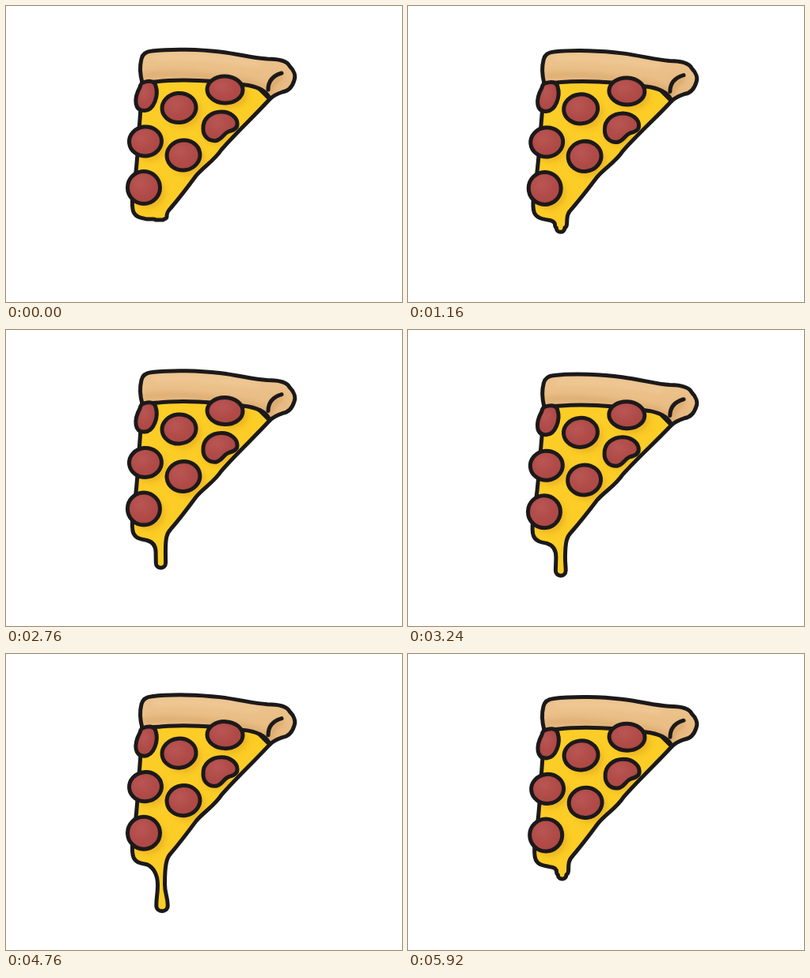
Write an HTML page that moves like this. It is 500 px wide and 375 px high and loops after 5.96 s.

```html
<!DOCTYPE html>
<html>
<head>
<meta charset="utf-8">
<style>
html, body { margin: 0; height: 100%; overflow: hidden; background: #fff; }
svg { display: block; width: 500px; height: 375px; }
.ink { stroke: #1c191a; stroke-width: 5; stroke-linejoin: round; stroke-linecap: round; }
</style>
</head>
<body>
<svg viewBox="0 0 500 375">
  <defs>
    <filter id="soft" x="-50%" y="-50%" width="200%" height="200%"><feGaussianBlur stdDeviation="3.5"/></filter>
    <radialGradient id="meat" cx=".4" cy=".36" r=".65">
      <stop offset="0" stop-color="#b95653"/>
      <stop offset=".6" stop-color="#b04b48"/>
      <stop offset="1" stop-color="#ac4744"/>
    </radialGradient>
    <linearGradient id="bread" x1="0" y1="0" x2="0" y2="1">
      <stop offset="0" stop-color="#edc48e"/>
      <stop offset="1" stop-color="#e7b97f"/>
    </linearGradient>
    <path id="cheese"/>
    <path id="crust" d="M172 97C169 86 169 75 171 67Q173 58 184 57C210 54 245 55 270 58C295 61 312 66 330 67
      C346 67 355 70 358 76C364 82 366 89 364 94C361 104 356 108 349 109C343 111 337 114 333 118
      C330 109 319 103 306 100.5C275 96 235 93 205 94.5C190 95.5 180 97 172 97Z"/>
    <clipPath id="inCheese"><use href="#cheese"/></clipPath>
    <clipPath id="inCrust"><use href="#crust"/></clipPath>
  </defs>
  <g id="slice">
    <path id="drop" class="ink" fill="#fccd26"/>
    <use href="#cheese" fill="#fccd26"/>
    <g clip-path="url(#inCheese)">
      <g id="shade" filter="url(#soft)" fill="#dfa424" opacity=".6"></g>
    </g>
    <use href="#cheese" class="ink" fill="none"/>
    <use href="#crust" fill="url(#bread)"/>
    <g clip-path="url(#inCrust)">
      <g filter="url(#soft)" fill="none" stroke-width="6" opacity=".6">
        <path d="M172 89C200 83 240 87 275 92S325 99 334 114" stroke="#cf9c5e"/>
        <path d="M332 113Q332 97 349 89" stroke="#c79152"/>
        <path d="M186 65Q250 62 320 74" stroke="#f3d0a0"/>
      </g>
    </g>
    <use href="#crust" class="ink" fill="none"/>
    <path class="ink" fill="none" d="M331 106Q331 90 348 85" stroke-width="4"/>
    <g id="toppings" class="ink" fill="url(#meat)">
      <path d="M173 97C181 94 188 95 189 101C193 113 187 132 175 132.5C162 133 161 118 169 103Q170 98 173 97Z"/>
      <path d="M249 156C248 142 260 134 272 134C284 134 292 142 292 149C293 156 285 158 281 159C274 162 274 168 266 170.5C255 172 249 164 249 156Z"/>
    </g>
  </g>
</svg>
<script>
const LOOP = 5960, STEP = 40, BREAK = 5400;
const el = id => document.getElementById(id);

// centre, radii and tilt of each round topping
const rounds = [
  [276.5, 106, 22.5, 17, 2], [218.5, 129, 21.5, 18.5, -6], [176, 171.5, 20.5, 18.5, -6],
  [224, 189, 21, 19, -8], [174, 230, 20.5, 20.5, 0]
];
const ellipse = ([x, y, rx, ry, tilt]) =>
  `<ellipse cx="${x}" cy="${y}" rx="${rx}" ry="${ry}" transform="rotate(${tilt} ${x} ${y})"/>`;
el('toppings').innerHTML += rounds.map(ellipse).join('');
el('shade').innerHTML = rounds.map(([x, y, rx, ry, a]) => ellipse([x + 6, y + 6, rx, ry, a])).join('') +
  ellipse([267, 157, 19, 17, -30]);

function bulb(len) {
  const k = Math.min(len / 58, 1.05);
  return { k, x: 193.5 + 3.5 * k, r: 4.7 + 2.5 * k, bottom: 271 + len };
}

function cheesePath(len) {
  const { k, x, r, bottom } = bulb(len);
  const q = Math.min(r, len * .4), y = f => 270 + f * len;
  const left = 186 + 5.5 * k, right = 203 - 2.5 * k;
  return `M172 94C171 120 169 145 167 170C166 195 164 215 160 240C159 250 159 256 161 261
    C164 268 172 269 178 270C185 ${y(.05)} ${left} ${y(.2)} ${left} ${y(.45)}
    C${left} ${y(.65)} ${x - r} ${y(.7)} ${x - r} ${bottom - q}
    C${x - r} ${bottom + q * .35} ${x + r} ${bottom + q * .35} ${x + r} ${bottom - q}
    C${x + r} ${y(.7)} ${right} ${y(.65)} ${right} ${267 + .48 * len}
    C${right} ${264 + .1 * len} 203 261 208 256
    C220 242 229 230 240 215C250 203 263 196 272 182C290 161 312 141 333 118L300 85L180 80Z`;
}

function dropPath(len, fall) {
  const { x, r, bottom } = bulb(len), b = bottom + fall;
  return `M${x} ${b - 25}C${x + 1} ${b - 18} ${x + r} ${b - 14} ${x + r} ${b - r}
    C${x + r} ${b + r * .35} ${x - r} ${b + r * .35} ${x - r} ${b - r}
    C${x - r} ${b - 14} ${x - 1} ${b - 18} ${x} ${b - 25}Z`;
}

function draw(t) {
  const phase = t / LOOP * 12 * Math.PI;
  const bob = 2.9 * (Math.sin(phase + .35) - Math.sin(.35));
  const tilt = .45 + .57 * Math.sin(phase - .91);
  el('slice').setAttribute('transform', `translate(0 ${bob}) rotate(${tilt} 270 90)`);

  const full = .0122 * Math.min(t, 5100);
  const s = (t - BREAK) / 1000;
  const len = s > 0 ? 14.5 + 26 * (1 - Math.min(s / .5, 1)) ** 2 : full;
  el('cheese').setAttribute('d', cheesePath(len));
  el('drop').setAttribute('d', s > 0 ? dropPath(full, 350 * s * s) : '');
}

const start = performance.now();
function tick() {
  const t = (performance.now() - start) % LOOP;
  draw(Math.floor(t / STEP) * STEP);
  requestAnimationFrame(tick);
}
tick();
</script>
</body>
</html>
```
